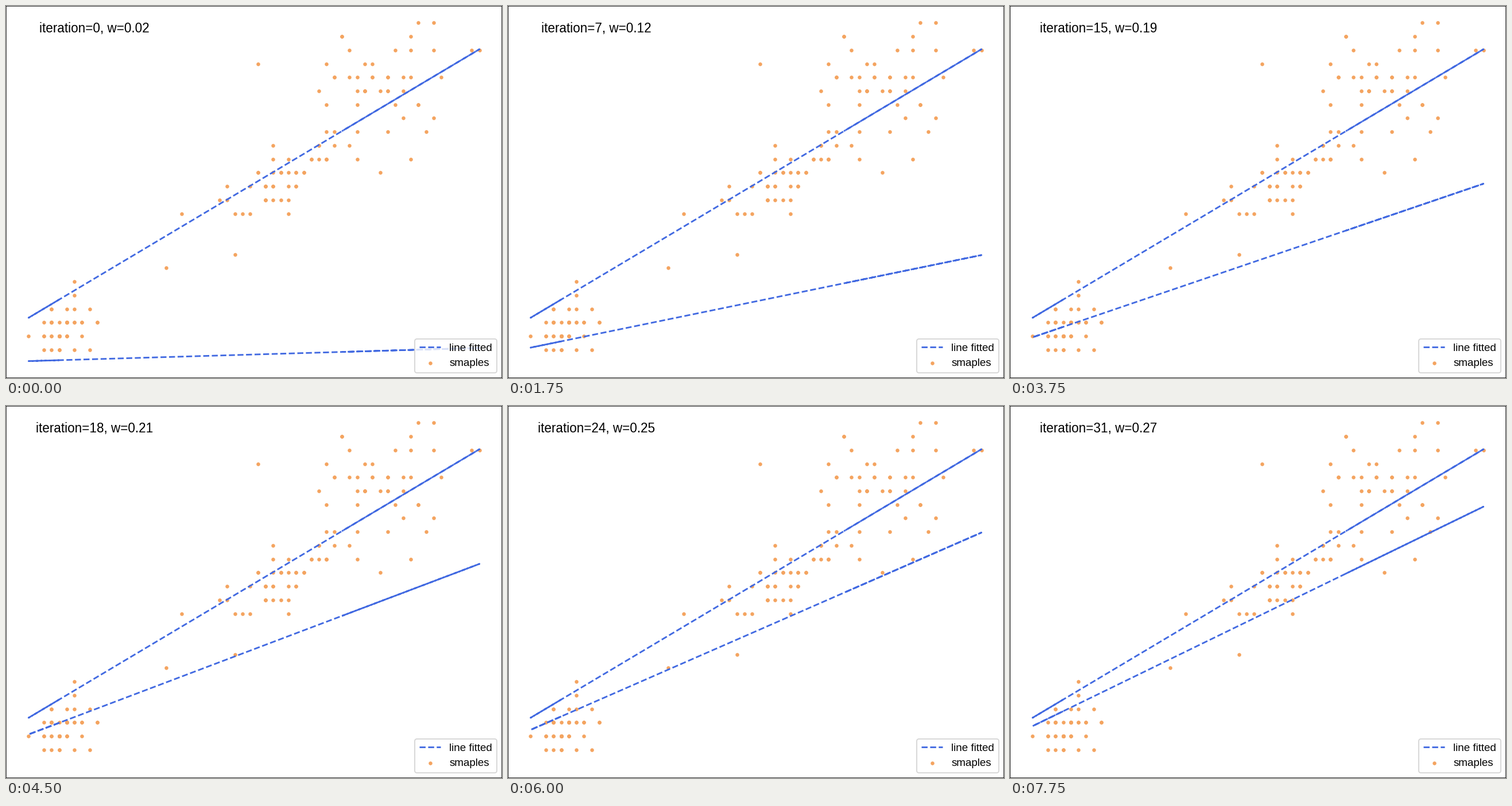
A matplotlib script for the animation above (8000 ms loop, 864 by 648 pixels).

```python
import matplotlib.pyplot as plt
import numpy as np
from matplotlib.animation import FuncAnimation

plt.rcParams["font.family"] = "Liberation Sans"
plt.rcParams["text.kerning_factor"] = 6  # evenly spaced digits

WIDTH, HEIGHT, DPI = 864, 648, 135
FRAMES, INTERVAL = 32, 250

BEST_W = 0.3343   # slope the descent converges to
FIRST_W = 0.0164
DECAY = 0.9482    # share of the error left after each step

X_MIN, X_MAX = 1.0, 6.9
Y_MIN, Y_MAX = 0.1, 2.5

# The line doubles back at both ends, so its dashes overlap there
LINE_X = np.array([1.4, X_MIN, X_MAX, 5.1])

# Outermost samples, which set the outline of the clusters
EDGE = [(1.0, 0.2), (1.6, 0.6), (3.0, 1.1), (5.6, 1.4),
        (6.3, 1.8), (6.9, 2.3), (6.1, 2.5), (5.1, 2.4)]


def slope(step):
    return BEST_W - (BEST_W - FIRST_W) * DECAY ** step


def padded(low, high, margin=0.05):
    pad = (high - low) * margin
    return low - pad, high + pad


def cluster(rng, center, spread, corr, count=46):
    """Correlated normal samples, measured to one decimal."""
    z = rng.standard_normal((count, 2))
    z = (z - z.mean(axis=0)) / z.std(axis=0)
    z[:, 1] = corr * z[:, 0] + np.sqrt(1 - corr ** 2) * z[:, 1]
    xy = np.array(center) + z * spread
    return np.clip(xy.round(1), (X_MIN, Y_MIN), (X_MAX, Y_MAX))


rng = np.random.default_rng(4)
points = np.vstack([
    cluster(rng, (1.46, 0.25), (0.17, 0.10), 0.33),
    cluster(rng, (4.28, 1.33), (0.45, 0.19), 0.79),
    cluster(rng, (5.55, 2.03), (0.52, 0.26), 0.32),
    EDGE,
])

fig = plt.figure(figsize=(WIDTH / DPI, HEIGHT / DPI), dpi=DPI, facecolor="white")
ax = fig.add_axes([0, 0, 1, 1])
ax.set(xlim=padded(X_MIN, X_MAX), ylim=padded(FIRST_W * X_MIN, Y_MAX),
       xticks=[], yticks=[])

samples = ax.scatter(*points.T, s=6, color="sandybrown", label="smaples")

line_style = dict(color="royalblue", linestyle="--", linewidth=1.5)
ax.plot(LINE_X, BEST_W * LINE_X, **line_style)
fitted, = ax.plot(LINE_X, FIRST_W * LINE_X, label="line fitted", **line_style)

ax.legend(handles=[fitted, samples], loc="lower right", fontsize=10)
caption = ax.text(154.2 / WIDTH, 1 - 45.7 / HEIGHT, "", transform=ax.transAxes,
                  fontsize=12, ha="center", va="baseline")


def update(step):
    w = slope(step)
    fitted.set_ydata(w * LINE_X)
    caption.set_text(f"iteration={step}, w={w:.2f}")
    return fitted, caption


anim = FuncAnimation(fig, update, frames=FRAMES, interval=INTERVAL,
                     repeat=True, repeat_delay=0)
plt.show()
```
